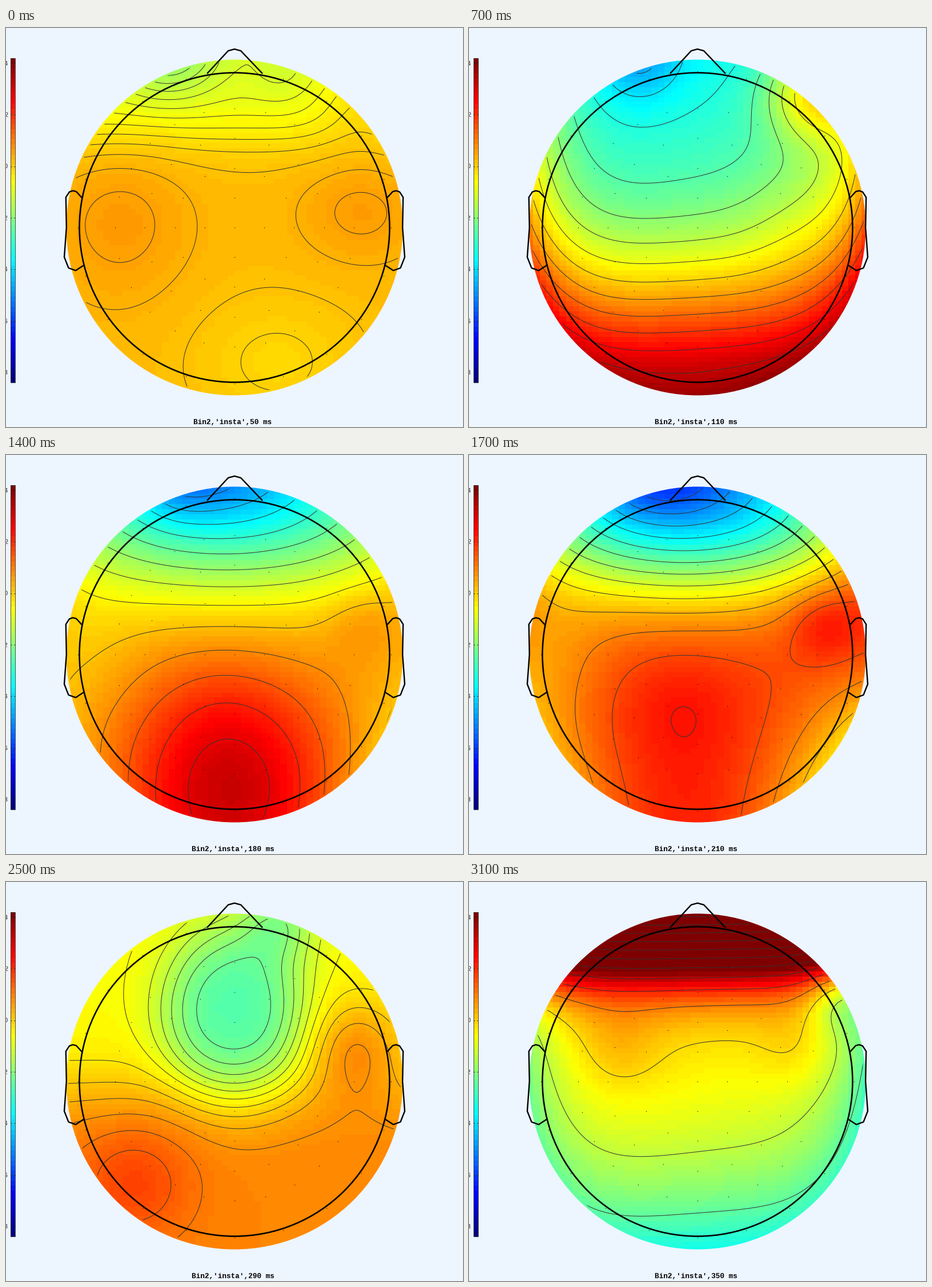
A matplotlib script that plays this animation: 800 by 700 pixels, repeating every 3.2 s.

```python
import numpy as np
import matplotlib.pyplot as plt
from matplotlib.animation import FuncAnimation
from matplotlib.colors import LinearSegmentedColormap
from matplotlib.patches import Circle, Rectangle

W, H, DPI = 800, 700, 100
CX, CY = 400, 350
HEAD_R, MAP_R = 271.5, 294.5
VMIN, VMAX = -8.4, 4.2
FRAMES, INTERVAL = 32, 100
CELL_X, CELL_Y = 11.5, 8.93
DARK = "#262626"

JET = LinearSegmentedColormap.from_list("scale", [
    (0, (0, 0, 0.5)), (0.125, (0, 0, 1)), (0.375, (0, 1, 1)),
    (0.625, (1, 1, 0)), (0.875, (1, 0, 0)), (1, (0.5, 0, 0))], N=128)


def px(n):
    return n * 72 / DPI


class Scalp:
    """Grid in head units: u to the right, v down, rim at radius 1."""

    def __init__(self, xs, ys):
        self.u, self.v = np.meshgrid((xs - CX) / MAP_R, (ys - CY) / MAP_R)

    def bump(self, u, v, su, sv=None, power=1):
        r2 = ((self.u - u) / su) ** 2 + ((self.v - v) / (sv or su)) ** 2
        return np.exp(-r2 ** power)

    def step(self, v, width):
        return np.tanh((self.v - v) / width)

    def ramp(self, v, width):
        """Zero above height v, then rising by 1 per unit (flipped if width < 0)."""
        return abs(width) * np.logaddexp(0, (self.v - v) / width)


# Potentials in microvolts at each key moment
def ms50(s):
    return (-0.275 + 0.575 * s.step(-0.55, 0.2)
            + 0.4 * s.bump(-0.68, -0.03, 0.4, 0.45)
            + 0.38 * s.bump(0.75, -0.1, 0.35, 0.3)
            - 0.36 * s.bump(0.25, 0.8, 0.5, 0.4)
            - 1.1 * s.bump(-0.4, -1.05, 0.3, 0.25)
            - 0.25 * s.bump(0.28, -0.95, 0.2)
            + 0.5 * s.bump(0.75, -0.75, 0.25))


def ms110(s):
    return (-2.7 + 0.85 * s.v + 6.2 * s.ramp(-0.05, 0.2)
            + 2.9 * s.u ** 4 + 0.35 * s.u
            - s.bump(0, 1.1, 0.6, 0.25)
            + 2.4 * s.bump(0.68, -0.8, 0.28)
            + 0.4 * s.bump(0.55, -0.1, 0.3, 0.5)
            - 1.2 * s.bump(-0.35, -1, 0.25))


def ms150(s):
    return (-0.6 + 1.7 * s.v - 0.2 * s.u
            + 3.55 * s.bump(0, 0.72, 0.63, 0.62)
            - 2.1 * s.bump(-0.1, -1.1, 0.65, 0.4)
            - 0.7 * s.bump(-0.35, -1, 0.2))


def ms210(s):
    return (-1.9 + 4.1 * s.step(-0.5, 0.42)
            - 5 * s.u ** 2 * s.v - 0.7 * s.u * s.v
            - s.bump(-0.25, -1, 0.35, 0.2)
            + 0.35 * s.bump(-0.1, 0.28, 0.35)
            + 0.9 * s.bump(0.76, -0.18, 0.22)
            - 0.9 * s.bump(-0.95, 0, 0.4))


def ms260(s):
    valley = np.abs(s.u) ** 1.3 * np.exp(-((s.v + 0.35) / 0.45) ** 2)
    return (-0.6 + 4.2 * s.step(-0.08, 0.55) + 2.4 * valley
            - 0.6 * s.u * s.v
            + 1.6 * s.bump(0.72, -0.15, 0.3)
            + 0.7 * s.bump(-0.65, -0.72, 0.25))


def ms290(s):
    return (0.2 + 0.75 * s.step(0.05, 0.25)
            - 2.1 * s.bump(0, -0.4, 0.44, 0.55, power=1.5)
            - 1.1 * s.bump(0.28, -0.95, 0.22)
            + 1.22 * s.bump(0.72, -0.2, 0.3)
            + 0.85 * s.bump(-0.6, 0.6, 0.35))


def ms350(s):
    return (-0.55 - s.v - 1.9 * s.v ** 2 + 28 * s.ramp(-0.51, -0.12)
            - 2 * s.u ** 4 - 0.3 * s.u
            + 0.5 * s.bump(-0.47, -0.2, 0.25)
            + 0.5 * s.bump(0.6, -0.2, 0.25)
            - 1.5 * s.bump(0.85, -0.5, 0.2))


FIELDS = [ms50, ms110, ms150, ms210, ms260, ms290, ms350]
MOMENTS = [50, 110, 150, 210, 260, 290, 350]
SPACING = [0.2, 0.66, 0.65, 0.68, 0.68, 0.35, 1.2]
OFFSET = [0, 0, 0.1, 0.34, 0.2, 0.1, -0.1]

cell_xs = CX + CELL_X * (np.arange(-26, 26) + 0.5)
cell_ys = CY + CELL_Y * np.arange(-33, 34)
line_xs = np.linspace(CX - MAP_R, CX + MAP_R, 110)
line_ys = np.linspace(CY - MAP_R, CY + MAP_R, 110)
cell_maps = [f(Scalp(cell_xs, cell_ys)) for f in FIELDS]
line_maps = [f(Scalp(line_xs, line_ys)) for f in FIELDS]

fig = plt.figure(figsize=(W / DPI, H / DPI), dpi=DPI, facecolor=(0.93, 0.96, 1))
ax = fig.add_axes([0, 0, 1, 1])
ax.axis("off")
ax.set_xlim(0, W)
ax.set_ylim(H, 0)
ax.set_autoscale_on(False)

# Colour bar at the cut-off left edge
ax.imshow(np.linspace(1, 0, 64)[:, None], cmap=JET, extent=(8, 16, 622, 53),
          aspect="auto", interpolation="nearest")
ax.add_patch(Rectangle((8, 53), 8, 569, fill=False, ec=DARK, lw=px(0.8)))
for value in range(-8, 5, 2):
    y = 242.5 - value * 45.2
    for x in (8, 14):
        ax.plot([x, x + 2], [y, y], color=DARK, lw=px(0.8))
    ax.text(3, y, str(value), family="Liberation Sans", size=px(11),
            color=DARK, ha="right", va="center_baseline")

# Scalp map
edge = Circle((CX, CY), MAP_R, transform=ax.transData)
rim = Circle((CX, CY), MAP_R - 3.5, transform=ax.transData)
image = ax.imshow(
    cell_maps[0], cmap=JET, vmin=VMIN, vmax=VMAX,
    extent=(cell_xs[0] - CELL_X / 2, cell_xs[-1] + CELL_X / 2,
            cell_ys[-1] + CELL_Y / 2, cell_ys[0] - CELL_Y / 2),
    aspect="auto", interpolation="nearest")
image.set_clip_path(edge)

# Electrodes on concentric rings
dots = [(CX, CY)]
for radius, count in ((52, 4), (104, 12), (157, 16), (209, 24), (274, 20)):
    a = np.arange(count) * 2 * np.pi / count
    dots += list(zip(CX + radius * np.cos(a), CY + radius * np.sin(a)))
ax.plot(*zip(*dots), ls="", marker="s", ms=px(1.1), mew=0, color="black", zorder=4)

# Head, nose and ears
ax.add_patch(Circle((CX, CY), HEAD_R, fill=False, ec="black", lw=px(2.6), zorder=5))
nose = [(352, 80), (389, 40), (400, 37), (411, 40), (449, 80)]
ear = [(133, 298), (123, 287), (117, 285.5), (111, 287.5), (104.8, 297),
       (105.8, 350), (102, 402), (109.5, 421), (122, 425.5), (136.5, 416)]
for outline in (nose, ear, [(W - x, y) for x, y in ear]):
    ax.plot(*zip(*outline), color="black", lw=px(2.4), zorder=5,
            solid_capstyle="butt")

label = ax.text(397, 695.2, "", family="Liberation Mono", weight="bold",
                size=px(12.65), ha="center", va="baseline")
lines = None


def blend(ms, maps):
    """Linear mix of the two key maps around the given moment."""
    k = min(np.searchsorted(MOMENTS, ms, side="right"), len(MOMENTS) - 1)
    t = (ms - MOMENTS[k - 1]) / (MOMENTS[k] - MOMENTS[k - 1])
    return (1 - t) * maps[k - 1] + t * maps[k]


def draw(i):
    global lines
    if lines is not None:
        lines.remove()
    ms = 50 + 10 * max(i - 1, 0)
    image.set_data(blend(ms, cell_maps))
    levels = blend(ms, OFFSET) + blend(ms, SPACING) * np.arange(-14, 15)
    lines = ax.contour(line_xs, line_ys, blend(ms, line_maps), levels=levels,
                       colors=[(0.2, 0.2, 0.2)], linewidths=px(1),
                       linestyles="solid", zorder=3)
    lines.set_clip_path(rim)
    label.set_text(f"Bin2,'insta',{ms} ms")
    return image, label


anim = FuncAnimation(fig, draw, frames=FRAMES, interval=INTERVAL,
                     init_func=lambda: draw(0), repeat=True, repeat_delay=0)
plt.show()
```
